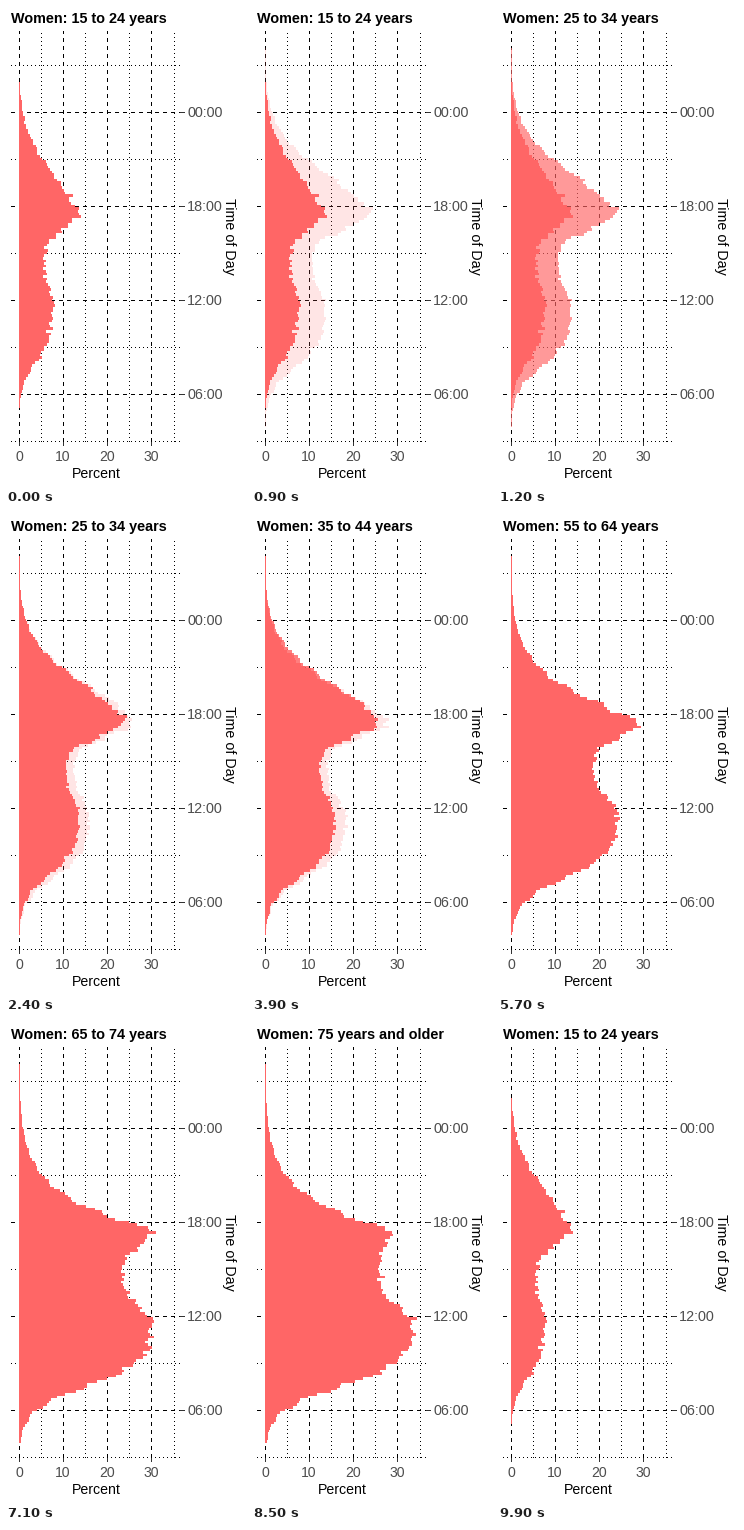
A matplotlib script for the animation above (10000 ms loop, 240 px wide and 480 px high).

```python
import numpy as np
import matplotlib.pyplot as plt
from matplotlib.animation import FuncAnimation
from matplotlib.patches import Polygon

W, H, DPI = 240, 480, 100
PX = 72 / DPI
RED, GREY, DARK = "#FF6666", "#4D4D4D", "#333333"
LEFT, RIGHT, TOP, BOTTOM = 5, 174, 25, 436
X0, PER_PERCENT, PER_HOUR = 13, 4.43, 94 / 6
DASHED, DOTTED = (4, 4), (1, 3)

plt.rcParams["font.family"] = ["Liberation Sans", "DejaVu Sans"]

NAMES = [f"{a} to {a + 9} years" for a in range(15, 75, 10)]
NAMES.append("75 years and older")
STARTS = [9, 24, 39, 52, 66, 80, 94]
STEPS = 6
PEAK = 17.4

hours = 4 + np.arange(145) / 6


def hour_y(hour):
    return 388 - (hour - 6) * PER_HOUR


def percent_x(percent):
    return X0 + percent * PER_PERCENT


def sigmoid(x):
    return 1 / (1 + np.exp(-x))


def profile(age):
    """Morning plateau, afternoon lull, evening peak and late decay."""
    ages = [0, 1, 3, 5, 6]
    morning = np.interp(age, ages, [7.8, 13.8, 18.4, 30.5, 34])
    evening = np.interp(age, ages, [13, 23.5, 27.5, 30, 28.5])
    youth = sigmoid((3.6 - age) * 1.8)
    wake = 7.5 + 0.6 * np.exp(-age)

    # Activities tend to start on the full hour
    t = hours + 0.12 * np.sin(2 * np.pi * hours)
    day = morning * sigmoid((t - wake) / 0.8)
    day *= 1 - 0.24 * sigmoid((t - 12.7) / 0.4)
    day += (evening - day) * np.exp(-((t - PEAK) / 1.2) ** 2)
    late = np.maximum(t - PEAK, 0) / (2.1 + 1.7 * youth)
    night = evening * np.exp(-late ** (1.1 + 0.7 * youth))
    share = np.where(t < PEAK, day, night)

    rng = np.random.default_rng(age + 3)
    share *= 1 + rng.normal(0, 0.018 + 0.03 * np.exp(-2 * age), t.size)
    if age == 0:
        return np.where(share < 0.2, 0, share)
    return np.maximum(share, 0.22)


PROFILES = [profile(i) for i in range(len(NAMES))]
half = PER_HOUR / 12
EDGES = np.column_stack([hour_y(hours) + half, hour_y(hours) - half]).ravel()


def outline(inner, outer):
    """Stepped band between two sets of bar ends."""
    near = np.column_stack([percent_x(np.repeat(inner, 2)), EDGES])
    far = np.column_stack([percent_x(np.repeat(outer, 2)), EDGES])
    return np.vstack([near, far[::-1]])


fig = plt.figure(figsize=(W / DPI, H / DPI), dpi=DPI, facecolor="white")
ax = fig.add_axes([0, 0, 1, 1])
ax.set(xlim=(0, W), ylim=(H, 0))
ax.axis("off")


def line(xs, ys, dash=None, color="black"):
    style = (0, dash) if dash else "-"
    ax.plot(xs, ys, color=color, lw=PX, ls=style, dash_capstyle="butt",
            solid_capstyle="butt", snap=False, zorder=1)


def label(x, y, text, size=14, **kw):
    return ax.text(x, y, text, fontsize=size * PX, va="baseline", **kw)


def grid_x(percent, dash):
    x = int(percent_x(percent)) + 0.5
    line([x, x], [BOTTOM, TOP], dash)
    return x


def grid_y(hour, dash):
    y = int(hour_y(hour)) + 0.5
    line([LEFT, RIGHT], [y, y], dash)
    return y


for percent in range(0, 40, 10):
    grid_x(percent + 5, DOTTED)
    x = grid_x(percent, DASHED)
    line([x, x], [BOTTOM, BOTTOM + 4], color=DARK)
    label(x - 0.5, 455, str(percent), ha="center", color=GREY)
for hour in range(3, 28, 6):
    grid_y(hour, DOTTED)
for hour in range(6, 25, 6):
    y = grid_y(hour, DASHED)
    line([RIGHT, RIGHT + 5], [y, y], color=DARK)
    label(181, y + 4.5, f"{hour % 24:02d}:00", 14.4, color=GREY)

label((LEFT + RIGHT) / 2 + 1, 472, "Percent", 14.1, ha="center")
label(219, 230.5, "Time of Day", 14.2, ha="center", rotation=-90,
      rotation_mode="anchor")
title = label(5, 17, "", 14.4, weight="bold")


def band():
    patch = Polygon([[0, 0], [0, 1], [1, 1]], closed=True, facecolor=RED,
                    edgecolor="none", lw=0, antialiased=False, zorder=2)
    return ax.add_patch(patch)


shared, leaving, entering = band(), band(), band()


def state(frame):
    """Current group, next group and progress between them."""
    i = sum(frame >= start + STEPS - 1 for start in STARTS) % len(NAMES)
    step = max(0, frame - STARTS[i] + 1) if frame < STARTS[-1] + STEPS - 1 else 0
    return i, (i + 1) % len(NAMES), step / STEPS


def update(frame):
    i, j, p = state(frame)
    old, new = PROFILES[i], PROFILES[j]
    common = np.minimum(old, new)
    shared.set_xy(outline(np.zeros_like(common), common))
    leaving.set_xy(outline(common, old))
    leaving.set_alpha(1 - p)
    entering.set_xy(outline(common, new))
    entering.set_alpha(p)
    title.set_text("Women: " + NAMES[j if p > 0.5 else i])
    return shared, leaving, entering, title


anim = FuncAnimation(fig, update, frames=100, interval=100, repeat=True,
                     repeat_delay=0, blit=False)
plt.show()
```
